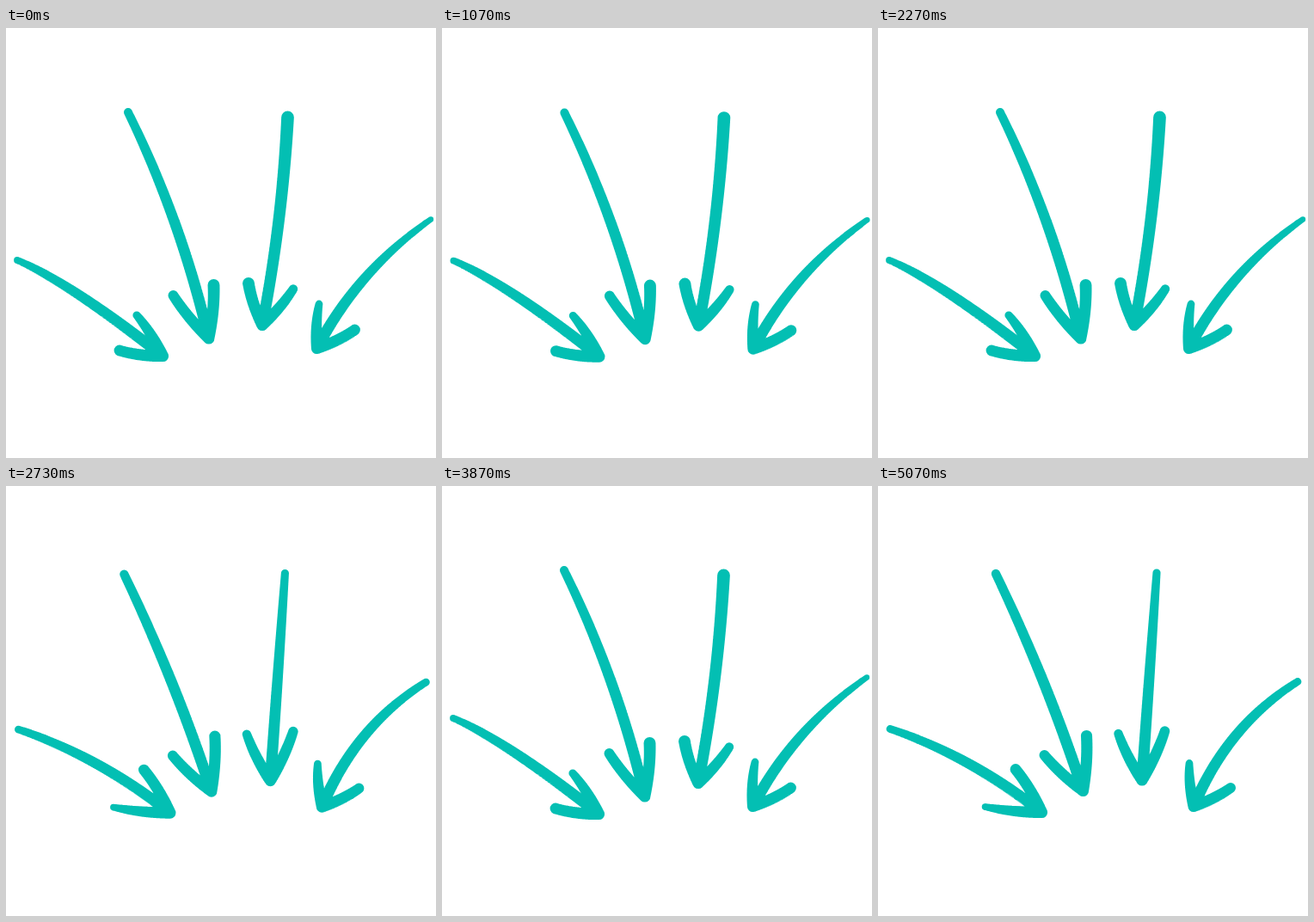
These frames come from a looping animation (500x500 px, 5110 ms). An HTML page with a canvas:

```html
<!DOCTYPE html>
<html lang="en">
<head>
<meta charset="utf-8">
<title>Hand-drawn arrows</title>
<style>
  html, body { margin: 0; width: 100%; height: 100%; overflow: hidden; background: #fff; }
  canvas { display: block; width: 500px; height: 500px; }
</style>
</head>
<body>
<canvas id="stage" width="500" height="500"></canvas>
<script>
const LOOP = 5110;
const BEAT = 400;                       // five drawings per beat
const STARTS = [0, 100, 170, 270, 330];
const COLOR = '#03bfb3';
const TIP = 6.6;                        // brush radius at every tip
const BULGE = 2;                        // how far barbs bow outwards
const RETRACE = [0.4, 0.6];             // drift of a retraced drawing

// Strokes start at [x, y, radius]; the shaft passes through its middle point.
const arrow = (start, middle, tip, ...barbs) => ({ start, middle, tip, barbs });

const high = [
  arrow([13, 270, 3.9], [86, 311], [182.5, 381.5], [152, 334, 4.6], [132, 375, 6.4]),
  arrow([142, 98, 5], [196, 226], [235.8, 361], [194.5, 311, 6], [241.5, 299, 7]),
  arrow([327.5, 104, 7.4], [317, 225], [298, 345.5], [282, 297, 7], [334, 303.5, 5.2]),
  arrow([494, 222.5, 3.2], [418, 290], [361.5, 372.5], [364, 321, 4.4], [405.5, 351, 6.4])
];
const low = [
  arrow([14, 282.5, 4.4], [104, 322], [190.5, 379.5], [160, 329.5, 6.4], [124.5, 373, 3.8]),
  arrow([137, 102, 5.2], [192, 227], [238.5, 354.5], [193.5, 313, 6], [242.5, 290.5, 6.6]),
  arrow([324, 101, 4.6], [315.5, 222], [307, 342], [279.5, 288, 5.2], [333.5, 285, 5.8]),
  arrow([488, 227.5, 4.4], [417, 289], [367, 372.5], [362, 322.5, 4.4], [410, 351, 6])
];
const poses = [[high, [0, 0]], [high, RETRACE], [low, RETRACE], [low, [0, 0]]];

const ctx = document.getElementById('stage').getContext('2d');

// A quadratic curve through the middle point, thickening towards the tip.
function brush([x, y, r], [mx, my], [tx, ty]) {
  const curve = (a, m, b, u) =>
    a + (b - a) * u + 4 * u * (1 - u) * (m - (a + b) / 2);
  const steps = Math.ceil(Math.hypot(tx - x, ty - y) * 1.2);
  for (let i = 0; i <= steps; i++) {
    const u = i / steps;
    const px = curve(x, mx, tx, u);
    const py = curve(y, my, ty, u);
    const size = r + (TIP - r) * (1 - (1 - u) ** 2);
    ctx.moveTo(px + size, py);
    ctx.arc(px, py, size, 0, Math.PI * 2);
  }
}

function drawArrow({ start, middle, tip, barbs }) {
  brush(start, middle, tip);
  barbs.forEach((barb, i) => {
    const other = barbs[1 - i];
    const gap = Math.hypot(barb[0] - other[0], barb[1] - other[1]);
    const bow = [0, 1].map(k =>
      (barb[k] + tip[k]) / 2 + BULGE * (barb[k] - other[k]) / gap);
    brush(barb, bow, tip);
  });
}

function draw([arrows, shift]) {
  ctx.clearRect(0, 0, 500, 500);
  ctx.save();
  ctx.translate(...shift);
  ctx.fillStyle = COLOR;
  ctx.beginPath();
  arrows.forEach(drawArrow);
  ctx.fill();
  ctx.restore();
}

function poseAt(t) {
  const beat = Math.floor(t / BEAT);
  const step = STARTS.filter(s => s <= t - beat * BEAT).length - 1;
  return (beat * STARTS.length + step) % poses.length;
}

const begin = performance.now();
let shown = -1;
function tick() {
  const pose = poseAt((performance.now() - begin) % LOOP);
  if (pose !== shown) draw(poses[shown = pose]);
  requestAnimationFrame(tick);
}
tick();
</script>
</body>
</html>
```
